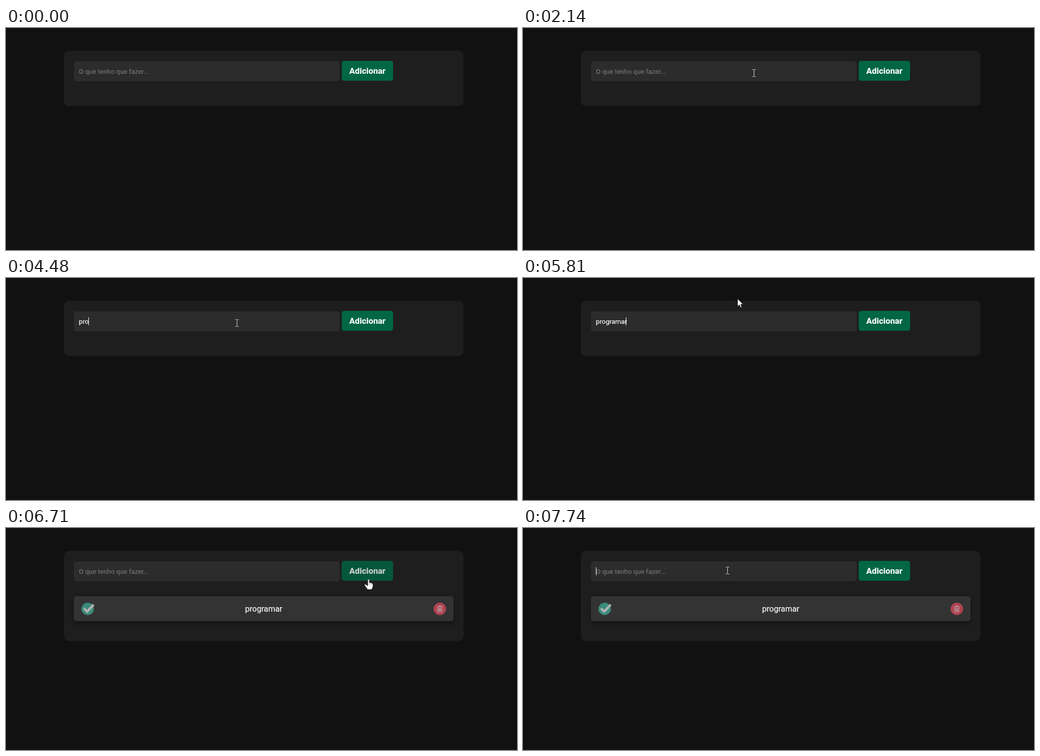
Animation, 1023 px wide and 446 px high, one loop 8000 ms. Source, as an HTML page:

```html
<!DOCTYPE html>
<html lang="pt">
<head>
<meta charset="utf-8">
<style>
  html, body { margin: 0; width: 100%; height: 100%; overflow: hidden; background: #111; }
  body { position: relative; color: #fff; font-family: Roboto, sans-serif; -webkit-text-stroke: .2px; }
  div, svg { position: absolute; box-sizing: border-box; }
  #card { left: 116px; top: 46px; width: 800px; height: 111px; border-radius: 10px; background: #1e1e1e; }
  #input { left: 136px; top: 67px; width: 532px; height: 40px; padding-left: 10px;
    border-radius: 5px; background: #2c2c2c; font-size: 13.333px; line-height: 42px; white-space: pre; }
  #caret { top: 79px; width: 1px; height: 16px; background: #fff; }
  #button { left: 672px; top: 66px; width: 103px; height: 40px; border-radius: 5px; background: #064;
    font-size: 16.8px; font-weight: 700; line-height: 40px; text-align: center; }
  #item { left: 136px; top: 137px; width: 760px; height: 50px; border-radius: 5px; background: #333;
    box-shadow: 0 4px 8px rgba(0, 0, 0, .4); font-size: 16px; line-height: 52px; text-align: center; }
  #item svg { left: 0; top: 0; opacity: .7; }
  #overlay { left: 0; top: 0; }
</style>
</head>
<body>
<div id="card"></div>
<div id="input"></div>
<div id="caret"></div>
<div id="button">Adicionar</div>
<div id="item">programar
  <svg width="760" height="50" fill="none">
    <circle cx="27.5" cy="25.5" r="12.5" fill="#3eaf9b"/>
    <path d="M20 24.5l6.5 6.5L39.5 17" stroke="#e4e4e4" stroke-width="4.8"/>
    <circle cx="732.5" cy="25.5" r="12.5" fill="#e64c5e"/>
    <path d="M727 21.5h11M730.5 21v-1.5h4V21M728 22.5l.6 9h7.8l.6-9M730.6 24v6M732.5 24v6M734.4 24v6" stroke="#eee"/>
  </svg>
</div>
<svg id="overlay" width="1023" height="446">
  <g id="pointer">
    <circle id="ring" r="12" fill="#faf000" fill-opacity=".5"/>
    <path id="arrow" d="M.5.5V16.3L4.1 12.9 6.7 18.6 9.2 17.5 6.7 12H11.6Z" fill="#fff" stroke="#000" stroke-width=".8"/>
    <path id="beam" d="M-1 -5.5H1.8M3.2 -5.5H6M-1 8.5H1.8M3.2 8.5H6M2.5 -5V8" fill="none" stroke="#ddd"/>
    <g id="hand" transform="translate(1)" stroke="#111" stroke-width=".7">
      <path d="M.2 2.8Q1.7 .6 3.2 2.8V8.6Q4.8 7.6 5.9 9.2Q7.2 8.4 8.3 10Q10.2 9.6 10.6 11.8V16Q10.3 19 8.8 20.6V22.6H-1V20.8Q-4 17.4 -6.4 13.6Q-5.6 11 -3 12.8L.2 15.4Z" fill="#fff"/>
      <path d="M3.2 9v4M5.9 9.6v3.6M8.3 10.4v3" stroke="#777"/>
    </g>
  </g>
</svg>
<script>
const LOOP = 8000, STEP = 70, BLINK = 530;
const FOCUS = 1610, PRESS = 6580, ADD = 6710, REFOCUS = 7660;
const WORD = 'programar';
const $ = id => document.getElementById(id);
const show = (el, on) => { el.style.visibility = on ? 'visible' : 'hidden'; };
const within = (t, from, length) => t >= from && t < from + length;
const inside = ([x, y], l, t, r, b) => x >= l && x < r && y >= t && y < b;

// Pointer strokes: key points of time, x, y and ease-out power.
const strokes = [
  [[790, 878, 382], [1210, 464, 26, 3], [1340, 462, 13, 1], [1540, 460, 89, 1]],
  [[5810, 429, 41], [5880, 415, 27, 1], [6090, 541, 32, 1], [6300, 665, 91, 1], [6510, 723, 101, 2]],
  [[6980, 715, 105], [7130, 650, 131, 1], [7400, 478, 122, 1], [REFOCUS, 407, 84, 2]]
];

function pointerAt(t) {
  const keys = strokes.filter(s => s[0][0] <= t).pop();
  if (!keys) return null;
  const start = keys[0][0];
  const now = start + Math.floor((t - start) / STEP) * STEP;
  const next = keys.findIndex(k => k[0] > now);
  if (next < 0) return keys[keys.length - 1].slice(1, 3);
  const [t0, x0, y0] = keys[next - 1], [t1, x1, y1, power] = keys[next];
  const e = 1 - (1 - (now - t0) / (t1 - t0)) ** power;
  return [x0 + (x1 - x0) * e, y0 + (y1 - y0) * e].map(Math.round);
}

// Each entry sets the field; only typing and focus restart the caret blink.
const edits = [{ at: 0, text: '' }];
const edit = (at, text, restart = true) => edits.push({ at, text, restart });
edit(FOCUS, '');
edit(2810, 'F');
edit(3010, 'Fa');
edit(3540, 'F', false);
edit(3720, '', false);
[4280, 4340, 4480, 4810].forEach((at, i) => edit(at, WORD.slice(0, i + 1)));
for (let n = 5; n <= WORD.length; n++) edit(4950 + (n - 5) * 100, WORD.slice(0, n));
edit(ADD, '', false);
edit(REFOCUS, '');

const pen = document.createElement('canvas').getContext('2d');
pen.font = '13.333px Roboto, sans-serif';
const caretX = text => Math.floor(146 + pen.measureText(text).width * .985);

function drawField(t) {
  const past = edits.filter(e => e.at <= t);
  const { text } = past[past.length - 1];
  const value = text || 'O que tenho que fazer...';
  if ($('input').textContent !== value) $('input').textContent = value;
  $('input').style.color = text ? '#fff' : '#757575';

  const lastKey = past.filter(e => e.restart).pop();
  const focused = within(t, FOCUS, PRESS - FOCUS) || t >= REFOCUS;
  show($('caret'), focused && (t - lastKey.at) % (2 * BLINK) < BLINK);
  $('caret').style.left = caretX(text) + 'px';
}

function drawPointer(t) {
  const pos = pointerAt(t);
  const onInput = !!pos && inside(pos, 136, 67, 668, 107);
  const onButton = !!pos && inside(pos, 672, 66, 775, 106);
  const pressed = within(t, FOCUS, 150) || within(t, PRESS, ADD - PRESS) || within(t, REFOCUS, 80);
  show($('arrow'), pos && !onInput && !onButton);
  show($('beam'), onInput);
  show($('hand'), onButton);
  show($('ring'), pressed);
  if (pos) $('pointer').setAttribute('transform', `translate(${pos})`);
  $('button').style.opacity = onButton ? (pressed ? .6 : .8) : 1;
}

function draw(t) {
  const added = t >= ADD;
  show($('item'), added);
  $('card').style.height = (added ? 181 : 111) + 'px';
  drawField(t);
  drawPointer(t);
}

const begin = performance.now();
function tick() {
  draw((performance.now() - begin) % LOOP);
  requestAnimationFrame(tick);
}
tick();
</script>
</body>
</html>
```
